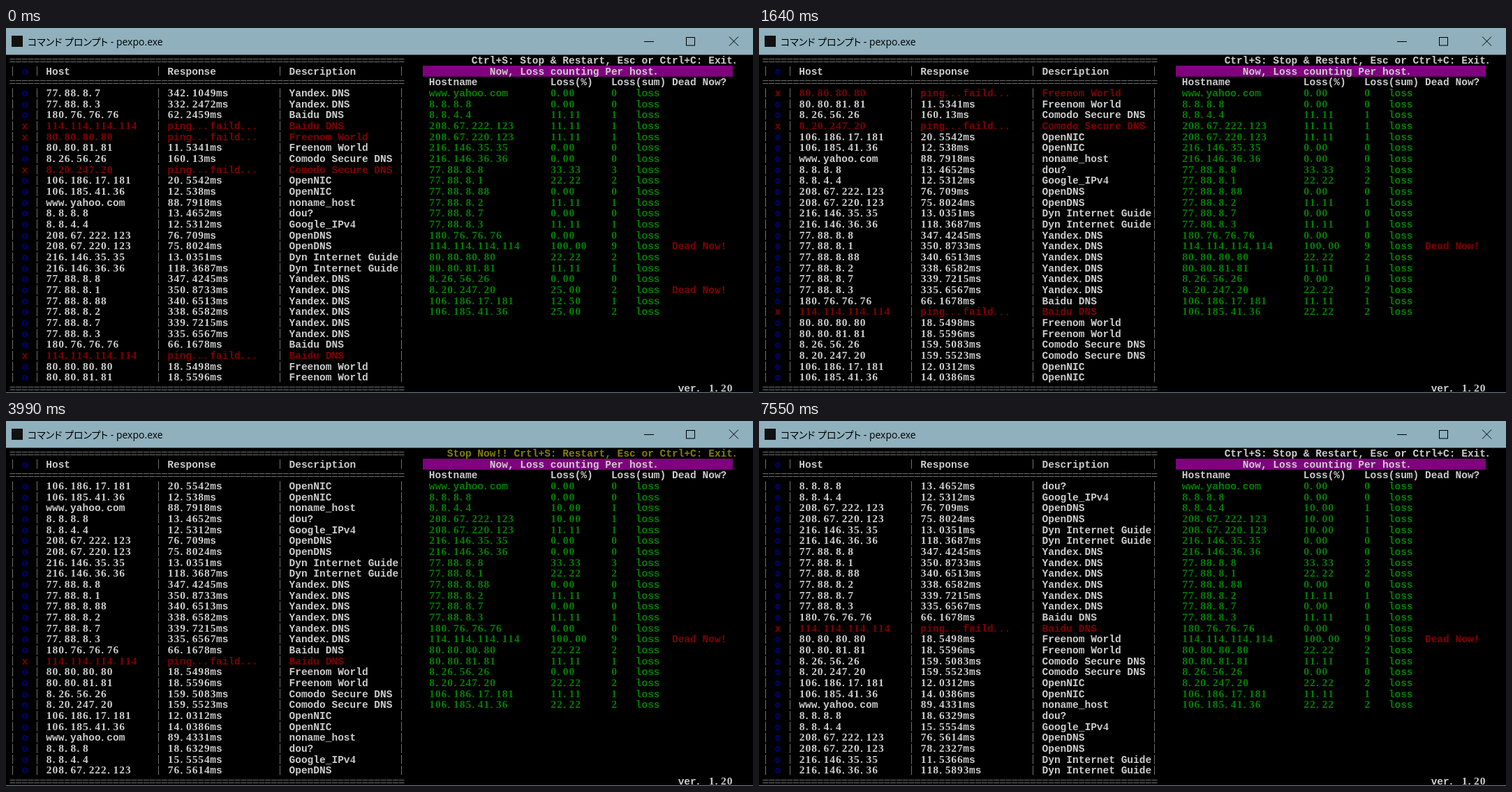
An HTML page with a canvas for the animation above (8000 ms loop, 1070 px wide and 523 px high).

```html
<!DOCTYPE html>
<html lang="ja">
<head>
<meta charset="utf-8">
<title>pexpo</title>
<style>
html, body { margin: 0; width: 100%; height: 100%; overflow: hidden; background: #000; }
canvas { position: absolute; left: 0; top: 0; display: block; }
#title {
  position: absolute; left: 31px; top: 9px; line-height: 22px; white-space: pre; color: #000;
  font: 14px/22px "Open Sans", "Noto Sans CJK JP", "Noto Sans CJK", sans-serif;
  font-feature-settings: "palt";
}
</style>
</head>
<body>
<canvas id="stage" width="1070" height="523"></canvas>
<div id="title">コマンド プロンプト - pexpo.exe</div>
<script>
const ctx = document.getElementById('stage').getContext('2d');
const LOOP = 8000;
const LEFT = 5, TOP = 38.3, CELL = 8.706, LINE = 15.67;
const WHITE = '#cccccc', GRAY = '#707070', RED = '#800000', GREEN = '#008000',
  BLUE = '#000080', YELLOW = '#808000', PURPLE = '#800080', BAR = '#8fb0bc';
const LETTERS = 'bold 14.5px "Liberation Mono", monospace';
const DIGITS = 'bold 15.5px "Liberation Serif", serif';

// Times at which one more ping result arrives
const PINGS = [130, 590, 1180, 1640, 2420, 2840, 3410, 3990, 6420, 6990, 7550];
const STOP = [3990, 6420];
const ROWS = 27;

// address, description, losses
const HOSTS = [
  ['www.yahoo.com', 'noname_host', 0],
  ['8.8.8.8', 'dou?', 0],
  ['8.8.4.4', 'Google_IPv4', 1],
  ['208.67.222.123', 'OpenDNS', 1],
  ['208.67.220.123', 'OpenDNS', 1],
  ['216.146.35.35', 'Dyn Internet Guide', 0],
  ['216.146.36.36', 'Dyn Internet Guide', 0],
  ['77.88.8.8', 'Yandex.DNS', 3],
  ['77.88.8.1', 'Yandex.DNS', 2],
  ['77.88.8.88', 'Yandex.DNS', 0],
  ['77.88.8.2', 'Yandex.DNS', 1],
  ['77.88.8.7', 'Yandex.DNS', 0],
  ['77.88.8.3', 'Yandex.DNS', 1],
  ['180.76.76.76', 'Baidu DNS', 0],
  ['114.114.114.114', 'Baidu DNS', 9],
  ['80.80.80.80', 'Freenom World', 2],
  ['80.80.81.81', 'Freenom World', 1],
  ['8.26.56.26', 'Comodo Secure DNS', 0],
  ['8.20.247.20', 'Comodo Secure DNS', 2],
  ['106.186.17.181', 'OpenNIC', 1],
  ['106.185.41.36', 'OpenNIC', 2]
];
const FIRST = 11;      // host of the first log entry
const NEXT = 17;       // host pinged next
const DEAD = 14, REVIVED = 18;

// Response times in ms, 0 for a failed ping
const LOG = [
  342.1049, 332.2472, 62.2459, 0, 0, 11.5341, 160.13, 0, 20.5542, 12.538,
  88.7918, 13.4652, 12.5312, 76.709, 75.8024, 13.0351, 118.3687, 347.4245,
  350.8733, 340.6513, 338.6582, 339.7215, 335.6567, 66.1678, 0, 18.5498,
  18.5596, 159.5083, 159.5523, 12.0312, 14.0386, 89.4331, 18.6329, 15.5554,
  76.5614, 78.2327, 11.5366, 118.5893
];

const colX = c => LEFT + c * CELL;
const rowY = r => TOP + r * LINE;

function rect(x, y, w, h, color) {
  ctx.fillStyle = color;
  ctx.fillRect(x, y, w, h);
}

// One character per console cell; digits have a plain zero
function put(col, row, text, color) {
  ctx.fillStyle = color;
  for (const [font, pattern] of [[LETTERS, /[^\d\s.]/g], [DIGITS, /\d/g]]) {
    ctx.font = font;
    for (const m of text.matchAll(pattern)) {
      ctx.fillText(m[0], colX(col + m.index + 0.5), rowY(row) + 12.6);
    }
  }
  // Full stops sit at the left of their cell
  for (const m of text.matchAll(/\./g)) {
    ctx.fillRect(colX(col + m.index) + 1.6, rowY(row) + 10.6, 2.1, 2);
  }
}

function rule(row) {
  const y = Math.round(rowY(row) + 7.5);
  for (let c = 0; c < 65; c++) {
    rect(colX(c) + 0.4, y - 2, CELL - 0.8, 1, GRAY);
    rect(colX(c) + 0.4, y + 2, CELL - 0.8, 1, GRAY);
  }
}

function tableRow(row, mark, cells, color) {
  for (const c of [0, 4, 24, 44, 64]) {
    rect(Math.floor(colX(c + 0.5)), rowY(row) + 1, 1, 13.5, GRAY);
  }
  put(2, row, mark, mark === 'x' ? RED : BLUE);
  cells.forEach((text, i) => put(6 + 20 * i, row, text, color));
}

function drawWindow() {
  rect(0, 0, 1070, 38.4, BAR);
  rect(8, 11, 16, 16, '#111');
  rect(914, 19, 14, 1, '#000');
  ctx.strokeStyle = '#000';
  ctx.lineWidth = 1;
  ctx.strokeRect(974.5, 13.5, 12, 11.5);
  ctx.beginPath();
  ctx.moveTo(1036, 12.5);
  ctx.lineTo(1049, 25.5);
  ctx.moveTo(1049, 12.5);
  ctx.lineTo(1036, 25.5);
  ctx.stroke();
}

function drawLog(step) {
  rule(0);
  tableRow(1, 'o', ['Host', 'Response', 'Description'], WHITE);
  rule(2);
  for (let i = 0; i < ROWS; i++) {
    const n = step + i, ms = LOG[n];
    const [address, label] = HOSTS[(FIRST + n) % HOSTS.length];
    const reply = ms ? ms + 'ms' : 'ping...faild...';
    tableRow(3 + i, ms ? 'o' : 'x', [address, reply, label], ms ? WHITE : RED);
  }
  rule(30);
}

function drawLosses(step, stopped) {
  if (stopped) put(72, 0, 'Stop Now!! Crtl+S: Restart, Esc or Ctrl+C: Exit.', YELLOW);
  else put(76, 0, 'Ctrl+S: Stop & Restart, Esc or Ctrl+C: Exit.', WHITE);

  rect(597, 54, 444, 15.7, PURPLE);
  put(79, 1, 'Now, Loss counting Per host.', WHITE);
  ['Hostname', 'Loss(%)', 'Loss(sum)', 'Dead Now?'].forEach((text, i) =>
    put([69, 89, 99, 109][i], 2, text, WHITE));

  HOSTS.forEach(([address, , lost], i) => {
    const row = 3 + i;
    // Hosts from NEXT on are one ping behind until their turn comes
    const order = (i - NEXT + HOSTS.length) % HOSTS.length;
    const total = (i < NEXT ? 9 : 8) + (step > order ? 1 : 0);
    const share = i === DEAD ? 100 : 100 * lost / total;
    put(69, row, address, GREEN);
    put(89, row, share.toFixed(2), GREEN);
    put(99, row, lost + '   loss', GREEN);
    if (i === DEAD || (i === REVIVED && step < 2)) put(109, row, 'Dead Now!', RED);
  });
  put(110, 30, 'ver. 1.20', WHITE);
}

function draw(t) {
  const step = PINGS.filter(p => t >= p).length;
  rect(0, 0, 1070, 523, '#000');
  drawWindow();
  ctx.textAlign = 'center';
  ctx.textBaseline = 'alphabetic';
  drawLog(step);
  drawLosses(step, t >= STOP[0] && t < STOP[1]);
  rect(0, 522, 1070, 1, '#6f7f86');
}

let start = null;
function tick(now) {
  if (start === null) start = now;
  draw((now - start) % LOOP);
  requestAnimationFrame(tick);
}
draw(0);
requestAnimationFrame(tick);
</script>
</body>
</html>
```
